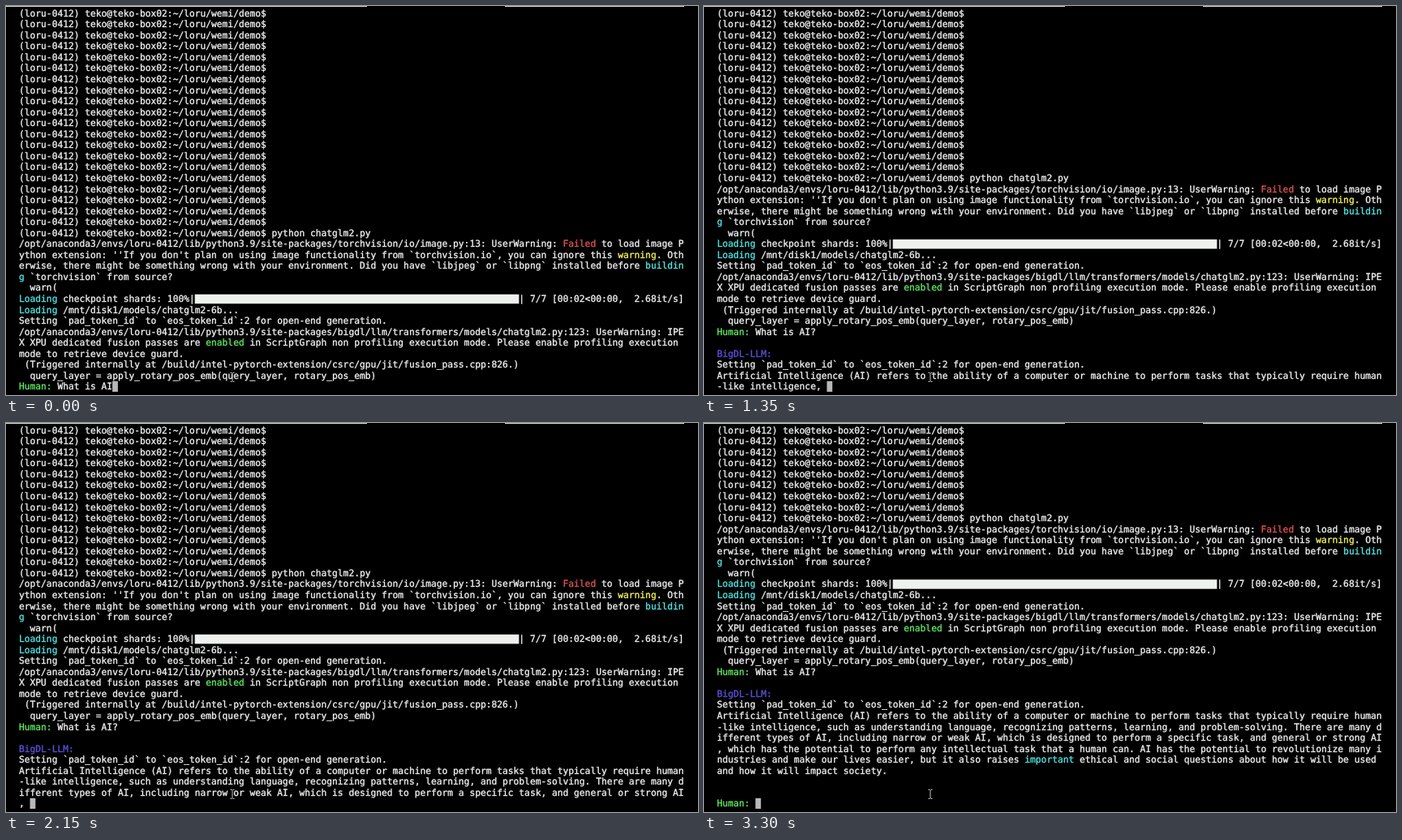
Write an HTML page with a canvas that moves like this. It is 853 px wide and 480 px high and loops after 3.4 s.

```html
<!DOCTYPE html>
<html lang="en">
<head>
<meta charset="utf-8">
<title>Terminal chat</title>
<style>
  html, body { margin: 0; width: 100%; height: 100%; overflow: hidden; background: #000; }
  canvas { display: block; width: 853px; height: 480px; }
</style>
</head>
<body>
<canvas id="stage" width="853" height="480"></canvas>
<script>
const ctx = document.getElementById('stage').getContext('2d');

const LOOP = 3400, TICK = 50;
const COLS = 121, ROWS = 35;
const LEFT = 16, TOP = 2, CELL_W = 6.773, CELL_H = 13.55, BASELINE = 10.7;
const FONT = '11.25px "DejaVu Sans Mono", monospace';
const TEXT_COLOR = '#f0f0f0', CURSOR_COLOR = '#b8b8b8', BAR_COLOR = '#eef2ee';

const HIGHLIGHTS = {
  'Failed': '#dc5450', 'warning': '#f2f25a', 'building': '#4fe3e3', 'Loading': '#4fe3e3',
  'important': '#4fe3e3', 'enabled': '#5fe65f', 'Human:': '#5fe65f', 'BigDL-LLM:': '#5b4fd6'
};
const KEYWORDS = /\b(?:Failed|warning|building|Loading|important|enabled)\b|Human:|BigDL-LLM:/g;

const PROMPT = '(loru-0412) teko@teko-box02:~/loru/wemi/demo$ ';
const PACKAGES = '/opt/anaconda3/envs/loru-0412/lib/python3.9/site-packages/';
const SETTING = 'Setting `pad_token_id` to `eos_token_id`:2 for open-end generation.';
const BAR = '\u2588';

const HISTORY = [
  ...Array(20).fill(PROMPT),
  PROMPT + 'python chatglm2.py',
  PACKAGES + "torchvision/io/image.py:13: UserWarning: Failed to load image Python extension: ''If you don't plan on using image functionality from `torchvision.io`, you can ignore this warning. Otherwise, there might be something wrong with your environment. Did you have `libjpeg` or `libpng` installed before building `torchvision` from source?",
  '  warn(',
  'Loading checkpoint shards: 100%|' + BAR.repeat(59) + '| 7/7 [00:02<00:00,  2.68it/s]',
  'Loading /mnt/disk1/models/chatglm2-6b...',
  SETTING,
  PACKAGES + 'bigdl/llm/transformers/models/chatglm2.py:123: UserWarning: IPEX XPU dedicated fusion passes are enabled in ScriptGraph non profiling execution mode. Please enable profiling execution mode to retrieve device guard.',
  ' (Triggered internally at /build/intel-pytorch-extension/csrc/gpu/jit/fusion_pass.cpp:826.)',
  '  query_layer = apply_rotary_pos_emb(query_layer, rotary_pos_emb)'
];

const ANSWER = 'Artificial Intelligence (AI) refers to the ability of a computer or machine to perform tasks that typically require human-like intelligence, such as understanding language, recognizing patterns, learning, and problem-solving. There are many different types of AI, including narrow or weak AI, which is designed to perform a specific task, and general or strong AI, which has the potential to perform any intellectual task that a human can. AI has the potential to revolutionize many industries and make our lives easier, but it also raises important ethical and social questions about how it will be used and how it will impact society.';

const ASK_AT = 700, ENTER_AT = 800, ANSWER_AT = 850, DONE_AT = 3100;

// Streaming pace: a time and the phrase that has just been printed
const PACE = [
  [1350, 'intelligence, '], [1900, 'weak '], [2500, 'revolutionize '],
  [2900, 'used '], [3050, 'impact ']
].map(([time, phrase]) => [time, ANSWER.indexOf(phrase) + phrase.length]);
PACE.unshift([ANSWER_AT, 0]);

// Only whole words followed by a space are printed while streaming
function streamed(t) {
  const next = PACE.findIndex(([time]) => time > t);
  let count = PACE[PACE.length - 1][1];
  if (next > 0) {
    const [t0, n0] = PACE[next - 1], [t1, n1] = PACE[next];
    count = Math.round(n0 + (n1 - n0) * (t - t0) / (t1 - t0));
  }
  return ANSWER.slice(0, ANSWER.slice(0, count).lastIndexOf(' ') + 1);
}

function linesAt(t) {
  const lines = [...HISTORY, 'Human: What is AI' + (t >= ASK_AT ? '?' : '')];
  if (t >= ENTER_AT) lines.push('', 'BigDL-LLM:');
  if (t >= ANSWER_AT) lines.push(SETTING);
  if (t >= DONE_AT) lines.push(ANSWER, '', '', 'Human: ');
  else if (t >= ENTER_AT) lines.push(streamed(t));
  return lines;
}

function wrap(line) {
  const cells = [...line].map(char => ({ char, color: TEXT_COLOR }));
  for (const match of line.matchAll(KEYWORDS)) {
    for (let i = 0; i < match[0].length; i++) cells[match.index + i].color = HIGHLIGHTS[match[0]];
  }
  const rows = [];
  do rows.push(cells.splice(0, COLS)); while (cells.length);
  return rows;
}

// A thin outline gives the letters a medium weight
function drawChar(char, color, x, y) {
  ctx.fillStyle = ctx.strokeStyle = color;
  ctx.fillText(char, x, y);
  ctx.strokeText(char, x, y);
}

function drawRow(cells, row) {
  const y = TOP + row * CELL_H;
  cells.forEach(({ char, color }, col) => {
    if (char !== ' ' && char !== BAR) drawChar(char, color, LEFT + col * CELL_W, y + BASELINE);
  });
  const first = cells.findIndex(cell => cell.char === BAR);
  if (first >= 0) {
    const width = cells.filter(cell => cell.char === BAR).length * CELL_W;
    ctx.fillStyle = BAR_COLOR;
    ctx.fillRect(LEFT + first * CELL_W, y + 1.5, width, 11.5);
  }
}

function drawCursor(col, row) {
  ctx.fillStyle = CURSOR_COLOR;
  ctx.fillRect(LEFT + Math.min(col, COLS - 1) * CELL_W, Math.round(TOP + row * CELL_H), CELL_W, 13);
}

function drawPointer() {
  ctx.fillStyle = '#c4c4c4';
  ctx.fillRect(278.5, 453, 1, 10);
  for (const y of [452, 463]) {
    ctx.fillRect(276.5, y, 2, 1);
    ctx.fillRect(279.5, y, 2, 1);
  }
}

function drawTopEdge() {
  ctx.fillStyle = '#dcdcdc';
  ctx.fillRect(0, 0, 445, 1);
  ctx.fillRect(615, 0, 221, 1);
}

function draw(t) {
  ctx.fillStyle = '#000';
  ctx.fillRect(0, 0, 853, 480);
  ctx.font = FONT;
  ctx.textRendering = 'geometricPrecision';
  ctx.lineWidth = 0.35;
  ctx.lineJoin = 'round';
  const rows = linesAt(t).flatMap(wrap).slice(-ROWS);
  rows.forEach(drawRow);
  drawCursor(rows[ROWS - 1].length, ROWS - 1);
  drawTopEdge();
  drawPointer();
}

const start = performance.now();
let shown = -1;

function frame() {
  const elapsed = (performance.now() - start) % LOOP;
  const t = Math.floor(elapsed / TICK) * TICK;
  if (t !== shown) draw(shown = t);
  requestAnimationFrame(frame);
}
frame();
</script>
</body>
</html>
```
